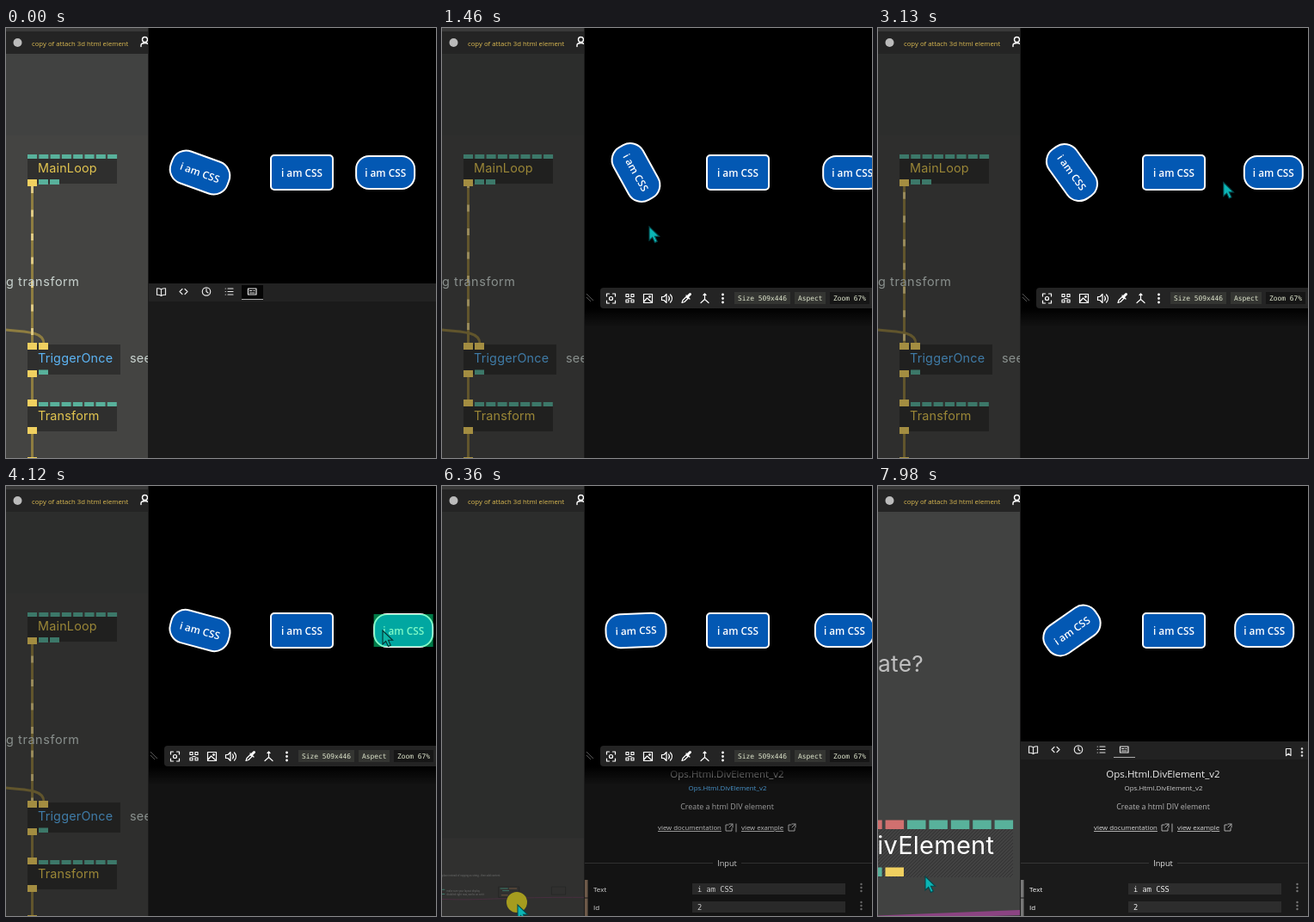
An HTML page that plays this animation: 500 px wide and 500 px high, repeating every 8000 ms.

```html
<!DOCTYPE html>
<html lang="en">
<head>
<meta charset="utf-8">
<title>CSS elements in a patch editor</title>
<style>
  html, body { margin: 0; width: 100%; height: 100%; overflow: hidden; background: #000; }
  svg { display: block; width: 100vw; height: 100vh; }
  text { font-family: "Open Sans", "Noto Sans", sans-serif; white-space: pre; }
  .op { font: 14.4px Inter, sans-serif; letter-spacing: .2px; }
  .big { font-family: Inter, sans-serif; letter-spacing: .25px; }
  .mono { font: 7.9px "DejaVu Sans Mono", monospace; }
  .value { font: 8.7px "DejaVu Sans Mono", monospace; }
  .mid { text-anchor: middle; }
  .icon { fill: none; stroke: #e6e6e6; stroke-width: 1.2; stroke-linejoin: round; stroke-linecap: round; }
  .pill rect { fill: #0358b3; stroke: #fff; stroke-width: 2; }
  .pill text { fill: #fff; font-size: 11.8px; font-weight: 600; text-anchor: middle; }
</style>
</head>
<body>
<svg viewBox="0 0 500 500">
  <defs>
    <clipPath id="patchClip"><rect width="165" height="500"/></clipPath>
    <linearGradient id="shade" x2="0" y2="1">
      <stop stop-color="#000"/><stop offset="1" stop-color="#000" stop-opacity="0"/>
    </linearGradient>
    <pattern id="hatch" width="4" height="4" patternUnits="userSpaceOnUse">
      <rect width="4" height="4" fill="#424242"/><path d="M-1 1L1 -1M0 4L4 0M3 5L5 3" stroke="#323232"/>
    </pattern>
  </defs>

  <!-- patch editor -->
  <g clip-path="url(#patchClip)">
    <rect width="165" height="500" fill="#414241"/>
    <g id="mainPatch">
      <rect y="125" width="165" height="375" fill="#444442"/>
      <g fill="none" stroke="#8e7d40" stroke-width="3">
        <path d="M30.5 184V366M30.5 405V433M30.5 471V500M0 351C26 353 44 354 44 367"/>
        <path id="flow" d="M30.5 184V366" stroke="#dfca83" stroke-dasharray="8 19.5"/>
      </g>
      <g fill="#2f2f2e">
        <rect x="25" y="152" width="104" height="29"/>
        <rect x="25" y="368" width="108" height="35"/>
        <rect x="25" y="440" width="104" height="29"/>
      </g>
      <g id="ports"></g>
      <text class="op" x="37" y="168" fill="#e2c550">MainLoop</text>
      <text class="op" x="37" y="389" fill="#5db5f5">TriggerOnce</text>
      <text class="op" x="37" y="456" fill="#e2c550">Transform</text>
      <text class="op" x="0" y="300" fill="#c9d3cf" style="letter-spacing:.6px">g transform</text>
      <text class="op" x="144" y="389" fill="#c9d3cf">see</text>
    </g>
    <g id="miniPatch">
      <rect y="380" width="260" height="260" fill="#464745"/>
      <g fill="#a5a5a5" font-size="4.3">
        <text y="449">place instead of copying as string - then add content</text>
        <text x="8" y="476.5">make sure your layout display</text>
        <text x="8" y="482.5">disabled right now, works on set it</text>
      </g>
      <path d="M0 472h5M0 480h5M104 470h14M108 474h12" stroke="#58b19b" stroke-width="1.5"/>
      <path d="M120 470h14M106 482h12" stroke="#c08a64" stroke-width="1.2"/>
      <path d="M101 467h37v19h-37zM196 467h25v14h-25z" fill="none" stroke="#333"/>
      <path d="M0 489C70 492 110 485 260 486" fill="none" stroke="#8b4375" stroke-width=".8"/>
    </g>
    <g id="zoomPatch">
      <text class="big" x="53" y="216" text-anchor="end" fill="#bfbfbf" font-size="26.3">create?</text>
      <rect x="-60" y="399" width="217" height="56" fill="url(#hatch)"/>
      <g id="bigPorts"></g>
      <text class="big" x="-22" y="428" fill="#fff" font-size="29">DivElement</text>
      <path d="M-40 501L165 493V499L-40 505z" fill="#8b4382"/>
    </g>
    <rect id="patchDim" y="30" width="165" height="470"/>
    <rect width="165" height="4" fill="#393939"/>
    <rect y="4" width="165" height="26" fill="#242424"/>
    <circle cx="13.5" cy="17" r="5" fill="#bbb"/>
    <text x="30" y="21" font-size="7.75" fill="#dcbb52">copy of attach 3d html element</text>
    <path class="icon" style="stroke:#fff;stroke-width:1.4" d="M158.500 13.500a3 3 0 1 0 6 0a3 3 0 1 0-6 0M157 21.500v-1.500q0-2.500 4.500-2.500t4.500 2.500v1.500"/>
  </g>
  <path d="M165.500 0V500" stroke="#1c1c1c"/>

  <!-- parameter panel -->
  <rect x="166" y="297" width="334" height="203" fill="#1a1a1a"/>
  <rect id="panelDim" x="166" y="318" width="334" height="182"/>
  <g id="params">
    <g class="mid">
      <text x="331.500" y="339" font-size="11.500" font-weight="500" fill="#eee">Ops.Html.DivElement_v2</text>
      <text id="opName" x="332" y="354" font-size="7.900">Ops.Html.DivElement_v2</text>
      <text x="331.500" y="376" font-size="8.900" fill="#b4b4b4">Create a html DIV element</text>
      <text x="331.500" y="442" font-size="9.200" font-weight="500" fill="#e6e6e6">Input</text>
    </g>
    <g font-size="7.800" fill="#d8d8d8" text-decoration="underline">
      <text x="251" y="400">view documentation</text><text x="348" y="400">view example</text>
    </g>
    <path class="icon" style="stroke:#aaa;stroke-width:1" d="M333 394h-3v7h7v-3M334 393h4v4M338 393l-4 4M406 394h-3v7h7v-3M407 393h4v4M411 393l-4 4M342 393v9"/>
    <path d="M166 438.500H315M348 438.500H500" stroke="#363636"/>
    <rect id="sideBar" x="166" y="458" width="3.500" height="42"/>
    <path d="M166 479h4" stroke="#1a1a1a"/>
    <path d="M291 462h178v13h-178zM291 483h178v13h-178z" fill="#2d2d2d"/>
    <g font-size="8" font-weight="500" fill="#fff"><text x="176" y="472">Text</text><text x="176" y="493">Id</text></g>
    <g fill="#eee"><text class="value" x="297" y="472">i am CSS</text><text class="value" x="297" y="493">2</text></g>
    <path d="M487.500 463v10M487.500 484v10" stroke="#777" stroke-width="2.400" stroke-linecap="round" stroke-dasharray="0 4"/>
  </g>

  <g id="tabs">
    <rect x="166" y="297" width="334" height="21" fill="#222"/>
    <rect id="activeTab" x="274" y="299" width="25" height="16" fill="#050505"/>
    <path d="M274 315.500h25" stroke="#aaa"/>
    <g class="icon">
      <path d="M180.500 304q-2-1.500-5-1.200v7.500q3-.3 5 1.200q2-1.500 5-1.200v-7.500q-3-.3-5 1.200v7.500"/>
      <path d="M205 303.500l-3 3l3 3M208 303.500l3 3l-3 3"/>
      <circle cx="233" cy="306.500" r="4.700"/><path d="M233 303.500v3l2 1.500"/>
      <path d="M258 303h6M258 306.500h6M258 310h6M255.200 303h.1M255.200 306.500h.1M255.200 310h.1"/>
      <path d="M281.500 303h9.500v7h-9.500zM283.500 305.500h2.500M283.500 308h5.500M288 305.500h1"/>
    </g>
    <g id="tabExtras">
      <path class="icon" d="M474.500 305.500h5.500v8l-2.700-2.300l-2.800 2.300z"/>
      <path d="M493 305.500v9" stroke="#ddd" stroke-width="2.600" stroke-linecap="round" stroke-dasharray="0 4"/>
    </g>
  </g>

  <g id="toolbar">
    <rect x="166" y="296" width="334" height="30"/>
    <rect x="166" y="326" width="334" height="22" fill="url(#shade)"/>
    <path d="M168 309l8 8M168 313l5 5" stroke="#555"/>
    <path d="M188 302H500V326H188q-4 0-4-4V306q0-4 4-4z" fill="#242424"/>
    <path d="M340 307h65v14h-65zM410 307h36v14h-36z" fill="#343532"/>
    <path d="M451 307h46v14h-46z" fill="#161616"/>
    <g class="icon" style="stroke:#fff">
      <path d="M191.500 312v-3h3M198.500 309h3v3M201.500 317v3h-3M194.500 320h-3v-3"/><circle cx="196.500" cy="314.500" r="2"/>
      <path d="M214 309.500h3v3h-3zM220 309.500h3v3h-3zM214 316h3v3h-3zM220 316h3v3h-3zM217 314.500h3"/>
      <path d="M234.500 309.500h10v10h-10zM235 318l3.500-4l5.500 5"/><circle cx="241.500" cy="312.500" r=".8"/>
      <path d="M255.500 312.500h2.500l3-3v10l-3-3h-2.500zM263.500 312q2 2.500 0 5M265.500 310q4 4.500 0 9"/>
      <path d="M279 319.500l1-3l4-4l2 2l-4 4zM284 311l4 4"/><path d="M285.500 312.500l3-3" stroke-width="3"/>
      <path d="M305.500 309v6.500l-4.500 4M305.500 315.500l4.500 4M304 310.500l1.500-1.500l1.500 1.500"/>
    </g>
    <path d="M326.500 310v10" stroke="#fff" stroke-width="2.800" stroke-linecap="round" stroke-dasharray="0 4.500"/>
    <g fill="#dfe6cd"><text class="mono" x="344" y="317">Size 509x446</text><text class="mono" x="414" y="317">Aspect</text><text class="mono" x="455" y="317">Zoom 67%</text></g>
  </g>

  <!-- rendered elements -->
  <g class="pill" id="spinner"><rect x="-35" y="-19.500" width="70" height="39" rx="17"/><text y="4.500">i am CSS</text></g>
  <g class="pill" transform="translate(344 168)"><rect x="-36" y="-20" width="72" height="40" rx="4"/><text y="4.500">i am CSS</text></g>
  <g class="pill" id="slider"><rect x="-34" y="-19" width="68" height="38" rx="15"/><text y="4.500">i am CSS</text></g>
  <rect id="highlight" fill="#00f590" opacity=".5"/>

  <circle id="click" r="12"/>
  <path id="cursor" d="M0 0V16L3.700 12.500L6.500 18.500L9.300 17.200L6.500 11.300H11.600z" stroke-width="1.100"/>
</svg>

<script>
const DURATION = 8000;
const $ = id => document.getElementById(id);
const show = (id, on) => { $(id).style.display = on ? "" : "none"; };
const set = (id, attributes) => {
  for (const [name, value] of Object.entries(attributes)) $(id).setAttribute(name, value);
};
const clamp = v => Math.min(1, Math.max(0, v));
const progress = (t, from, to) => clamp((t - from) / (to - from));
const ease = p => p * p * (3 - 2 * p);
const mix = (a, b, p) => a + (b - a) * p;

// Keys are [time, value, ...]
const spin = [[0, 20], [450, -36], [900, 21], [1760, 88], [2220, 173.5], [2800, 100], [3410, 18], [3780, -14],
  [4120, 15], [4650, 95], [5170, 158], [5650, 85], [6360, -2], [7200, -36], [7980, -35], [8000, -34]];
const swing = [[0, -.369], [900, .453], [2220, 1.842], [4120, 3.794], [5170, 4.825], [6360, 6.158], [7980, 7.699], [8000, 7.72]];
const pointer = [[300, 320, 500], [750, 241, 231], [2550, 241, 231], [3350, 438, 168], [4250, 438, 168],
  [4750, 348, 173], [5350, 348, 173], [6150, 88, 487], [6600, 88, 487], [7300, 55, 454], [8000, 55, 454]];

function segment(keys, t) {
  let i = 0;
  while (i < keys.length - 2 && t >= keys[i + 1][0]) i++;
  return [i, progress(t, keys[i][0], keys[i + 1][0])];
}

function linear(keys, t) {
  const [i, p] = segment(keys, t);
  return mix(keys[i][1], keys[i + 1][1], p);
}

function smooth(keys, t) {
  const [i, p] = segment(keys, t);
  const slope = k => {
    const a = keys[Math.max(0, k - 1)], b = keys[Math.min(keys.length - 1, k + 1)];
    return (b[1] - a[1]) / (b[0] - a[0]);
  };
  const span = keys[i + 1][0] - keys[i][0], q = 1 - p;
  return mix(keys[i][1], keys[i + 1][1], ease(p)) + span * p * q * (q * slope(i) - p * slope(i + 1));
}

function addPorts(id, y, height, width, color, xs) {
  $(id).innerHTML += xs.map(x => `<rect x="${x}" y="${y}" width="${width}" height="${height}" fill="${color}"/>`).join("");
}
const row = (start, count, pitch) => Array.from({ length: count }, (_, i) => start + i * pitch);
const TEAL = "#58b19b", YELLOW = "#f0d060", RED = "#d0706f";
addPorts("ports", 147, 5, 11, TEAL, row(25, 8, 13.3));
addPorts("ports", 176, 6, 11, TEAL, [38, 51]);
addPorts("ports", 397.5, 5.5, 11, TEAL, [38]);
addPorts("ports", 435, 5, 11, TEAL, row(38, 7, 13.3));
addPorts("ports", 366, 8, 11, YELLOW, [25, 38]);
for (const y of [176, 398, 432, 464, 499]) addPorts("ports", y, 8, 11, YELLOW, [25]);
addPorts("bigPorts", 388.5, 10.5, 21.5, RED, row(-42.2, 3, 25.4));
addPorts("bigPorts", 388.5, 10.5, 21.5, TEAL, row(34, 5, 25.4));
addPorts("bigPorts", 443.5, 10.5, 21.5, TEAL, [-16.900]);
addPorts("bigPorts", 443.5, 10.5, 21.5, YELLOW, [8.5]);

function drawPatch(t) {
  const zoomOut = mix(1, .65, ease(progress(t, 5250, 5900)));
  const zoomIn = ease(progress(t, 6500, 7400));
  const grow = Math.pow(8, zoomIn);
  show("mainPatch", t < 5100);
  show("miniPatch", t >= 5100 && zoomIn < .6);
  show("zoomPatch", zoomIn > 0);
  set("flow", { "stroke-dashoffset": -t * .09 });
  set("miniPatch", {
    transform: `translate(88 488) scale(${grow}) translate(-88 -488) translate(0 ${464.3 * (1 - zoomOut)}) scale(${zoomOut})`,
    opacity: 1 - clamp(zoomIn / .6)
  });
  set("zoomPatch", {
    transform: `translate(70 470) scale(${grow / 8}) translate(-70 -470)`,
    opacity: clamp(zoomIn * 2)
  });
}

function drawPanels(t) {
  const dim = progress(t, 1150, 1350) - progress(t, 6450, 6650);
  const focused = dim > .5, late = t > 6000;
  set("patchDim", { opacity: .32 * dim });
  set("panelDim", { opacity: .28 * dim });
  set("params", { opacity: 1 - .15 * dim });
  show("tabs", !focused);
  show("toolbar", focused);
  show("params", t >= 5100);
  show("tabExtras", late);
  show("activeTab", !late);
  set("opName", { fill: focused ? "#50a8e8" : "#ccc" });
  set("sideBar", { fill: focused ? "#7d6653" : "#777" });
}

function drawElements(t) {
  const sliderX = 456 + 22 * Math.cos(2 * Math.PI * linear(swing, t));
  set("spinner", { transform: `translate(225.5 168) rotate(${smooth(spin, t)})` });
  set("slider", { transform: `translate(${sliderX} 168)` });

  const [i, p] = segment(pointer, t);
  const [x, y] = [1, 2].map(k => mix(pointer[i][k], pointer[i + 1][k], ease(p)));
  const boxes = [{ cx: sliderX, w: 69, h: 38 }, { cx: 344, w: 74, h: 42 }];
  const target = boxes.find(({ cx, w, h }) => Math.abs(x - cx) < w / 2 && Math.abs(y - 168) < h / 2);
  show("highlight", target);
  if (target) {
    const { cx, w, h } = target;
    set("highlight", { x: cx - w / 2, y: 168 - h / 2, width: w, height: h });
  }
  show("cursor", t >= 300);
  set("cursor", {
    transform: `translate(${x} ${y})`,
    fill: target ? (x < 400 ? "#1660a0" : "#0cb5a4") : "#0bb5b5",
    stroke: target ? "#06302f" : "#05484c"
  });

  const onCanvas = t < 6000;
  const age = t - (onCanvas ? 5050 : 6230);
  show("click", age >= 0 && age < 340);
  set("click", {
    transform: onCanvas ? "translate(347 171)" : "translate(87 484)",
    fill: onCanvas ? "#0a59a8" : "#a59c1f",
    opacity: (onCanvas ? .8 : 1) * (1 - progress(age, 220, 340))
  });
}

function frame(now) {
  const t = now % DURATION;
  drawPatch(t);
  drawPanels(t);
  drawElements(t);
  requestAnimationFrame(frame);
}
requestAnimationFrame(frame);
</script>
</body>
</html>
```
